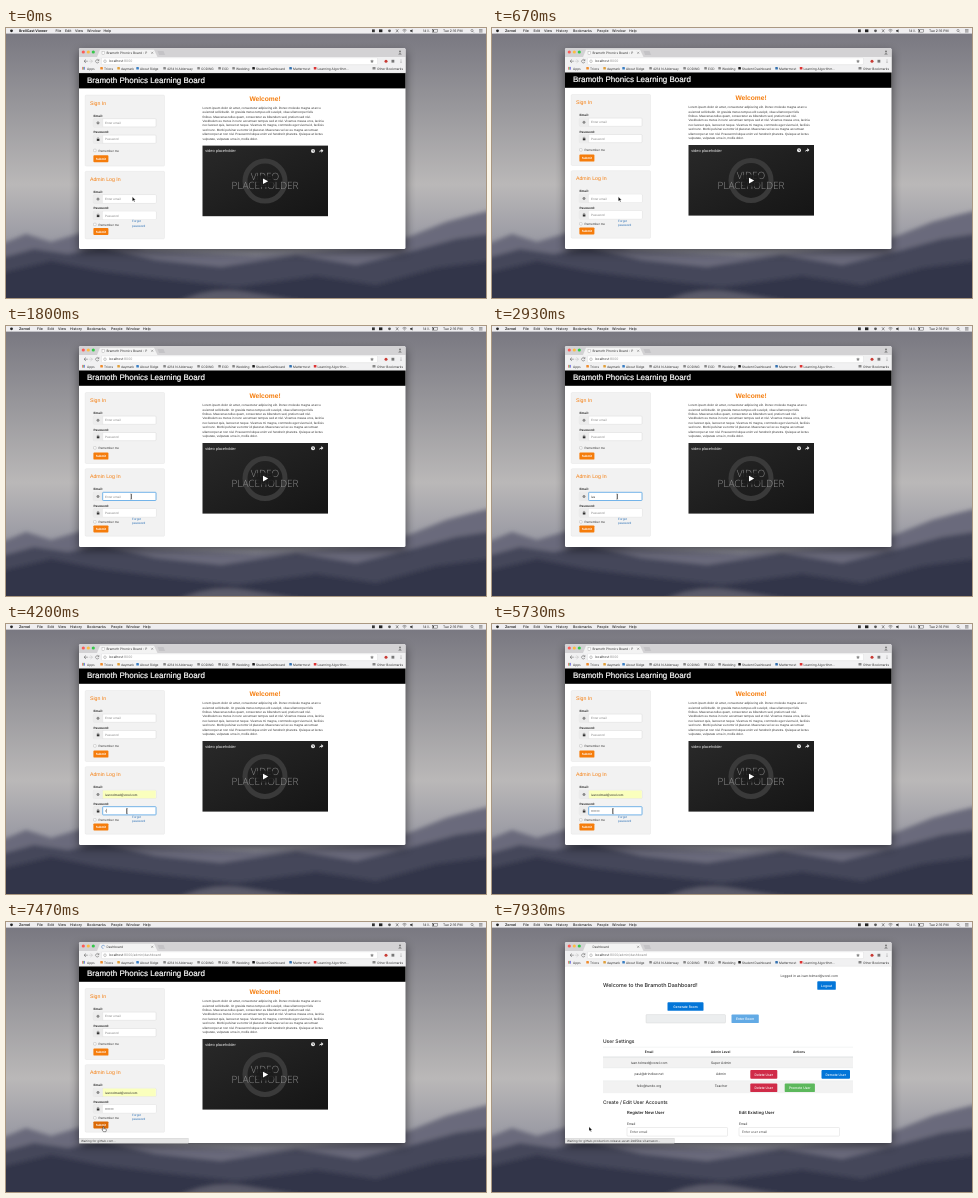
Write an HTML page that moves like this. It is 480 by 270 pixels and loops after 8000 ms.

```html
<!DOCTYPE html>
<html lang="en">
<head>
<meta charset="utf-8">
<title>Learning board sign-in</title>
<style>
  html, body { margin: 0; width: 100%; height: 100%; overflow: hidden; }
  svg { display: block; width: 480px; height: 270px; }
  text { text-rendering: geometricPrecision; white-space: pre; }
</style>
</head>
<body>
<svg id="stage" viewBox="0 0 480 270"></svg>
<script>
const LOOP = 8000;
const ORANGE = '#f57c0b', BLUE = '#0275d8', RED = '#d02b48', GREEN = '#5cb85c';
const WEB = 'Liberation Sans, Arial, sans-serif', UI = 'Inter, Roboto, sans-serif';
const MAIL = 'ivan.tolmed@vorel.com';

const rect = (x, y, w, h, fill, more = '') =>
  `<rect x="${x}" y="${y}" width="${w}" height="${h}" fill="${fill}" ${more}/>`;
const dot = (x, y, r, fill, more = '') =>
  `<circle cx="${x}" cy="${y}" r="${r}" fill="${fill}" ${more}/>`;
const path = (d, fill, more = '') => `<path d="${d}" fill="${fill}" ${more}/>`;
const line = (d, color, width = .5) =>
  path(d, 'none', `stroke="${color}" stroke-width="${width}"`);
const group = (id, ...parts) => `<g id="${id}">${parts.join('')}</g>`;
const label = (font) => (x, y, size, str, fill = '#333', more = '') =>
  `<text x="${x}" y="${y}" font-size="${size}" font-family="${font}" fill="${fill}" ${more}>${str}</text>`;
const web = label(WEB), ui = label(UI);
const BOLD = 'font-weight="700"', SEMI = 'font-weight="600"', MEDIUM = 'font-weight="500"';
const MID = 'text-anchor="middle"';

function wallpaper() {
  return `<defs>
    <linearGradient id="sky" x2="0" y2="1">
      <stop offset="0" stop-color="#77767f"/><stop offset=".3" stop-color="#99989c"/>
      <stop offset=".58" stop-color="#bab8b8"/><stop offset=".78" stop-color="#9b9ba4"/>
      <stop offset="1" stop-color="#6c6d7c"/>
    </linearGradient>
    <linearGradient id="film" x2="1" y2="1">
      <stop offset="0" stop-color="#292929"/><stop offset="1" stop-color="#151515"/>
    </linearGradient>
    <filter id="soft"><feGaussianBlur stdDeviation="2"/></filter>
    <filter id="shade"><feGaussianBlur stdDeviation="5"/></filter>
  </defs>` +
  rect(0, 0, 480, 270, 'url(#sky)') +
  `<g filter="url(#soft)">` +
  path('M-9 218L20 206 45 214 75 205 140 222 250 228 360 220 405 208 440 194 462 188 490 181V280H-9Z', '#6a6b7b') +
  path('M-9 231L28 221 62 226 95 219 150 232 215 239 290 227 350 237 410 222 450 211 490 205V280H-9Z', '#45475a') +
  path('M-9 246L45 233 95 243 150 250 230 259 310 248 370 257 430 240 490 232V280H-9Z', '#333548') +
  path('M160 280Q200 257 240 264T340 280Z', '#5b5c6b') + '</g>';
}

function menuBar() {
  const items = (list) => list.map(([x, s], i) =>
    ui(x, 4.1, 3.5, s, '#222', i ? MEDIUM : BOLD)).join('');
  return rect(0, 0, 480, 5.6, '#efeef0') + dot(5.5, 2.8, 1.4, '#222') +
    group('viewerMenu', items([[13, 'BrellCast Viewer'], [49.5, 'File'], [59, 'Edit'], [69, 'View'], [81, 'Window'], [97.5, 'Help']])) +
    group('browserMenu', items([[13, 'Zorvel'], [31, 'File'], [41.5, 'Edit'], [52, 'View'], [64, 'History'],
      [81, 'Bookmarks'], [105, 'People'], [120, 'Window'], [137, 'Help']])) +
    rect(366, 1.4, 2.8, 2.8, '#333') + rect(373, 1.4, 3.4, 2.8, '#222') + dot(383.5, 2.8, 1.4, '#555') +
    line('M390 1.3l2.4 3m0-3l-2.4 3', '#333') + line('M396.5 2.2q2-1.6 4 0m-3.2 1q1.2-1 2.4 0m-1.2.4v.8', '#333') +
    path('M404 2.2h1l1.5-1v3.4l-1.5-1h-1z', '#333') +
    ui(417, 4.1, 3.3, '14%', '#222') + rect(426.5, 1.7, 5, 2.4, 'none', 'stroke="#333" stroke-width=".4"') + rect(427, 2.1, 1, 1.6, '#333') +
    ui(437, 4.1, 3.4, 'Tue 2:16 PM', '#222') +
    dot(466, 2.5, 1.1, 'none', 'stroke="#333" stroke-width=".4"') + line('M466.8 3.4l1 1', '#333') +
    line('M473 1.6h3.5m-3.5 1.2h3.5m-3.5 1.2h3.5', '#333', .45);
}

function browser() {
  const marks = [[98, 'Trivos', '#ef8b2c'], [115, 'daymark', '#e0a03c'], [134, 'About Ridge', '#3a7fc4'],
    [161, '4214 N Alderway', '#888'], [195, 'CODING', '#888'], [216, 'EOD', '#888'], [230, 'Wedding', '#888'],
    [250, 'Student Dashboard', '#222'], [287, 'Mattermost', '#3572b0'], [311.5, 'Learning Algorithm...', '#d33']];
  return rect(73, 24, 327, 200, '#000', 'opacity=".5" filter="url(#shade)"') +
    rect(73, 20, 326.5, 201, '#fff', 'rx="1.5"') +
    path('M73 29V21.5q0-1.5 1.5-1.5H398q1.5 0 1.5 1.5V29Z', '#d3d2d4') +
    ['#fc5b57', '#fdbc40', '#34c84a'].map((c, i) => dot(77.3 + 5 * i, 24, 1.6, c)).join('') +
    path('M91 29L94 21.8H148L151.5 29Z', '#f3f3f3') + path('M151.5 23h6l1.6 4h-6z', '#c4c3c6') +
    line('M145.2 23.8l2 2m0-2l-2 2', '#555', .4) +
    dot(394, 23.5, 1, '#777') + path('M392.2 26.5q1.8-3 3.6 0z', '#777') +
    rect(73, 29, 326.5, 15.5, '#f1f1f2') + rect(95.5, 29.8, 276, 6.8, '#fff', 'rx=".8" stroke="#d0d0d0" stroke-width=".3"') +
    line('M80 31.5l-2 1.7 2 1.7m-2-1.7h3.8', '#555') + line('M84.5 31.5l2 1.7-2 1.7m2-1.7h-3.8', '#bbb') +
    line('M92.8 32.4a1.7 1.7 0 1 0 .1 1.5m0-2.7v1.5h-1.5', '#555') +
    dot(99, 33.2, 1.3, 'none', 'stroke="#666" stroke-width=".35"') +
    path('M366 31.4l.6 1.2 1.3.2-1 .9.3 1.3-1.2-.7-1.2.7.3-1.3-1-.9 1.3-.2z', '#888') +
    dot(380, 33.2, 1.5, '#c83a34') + rect(385.5, 31.8, 2.8, 2.8, '#777') + dot(395, 31.9, .4, '#555') + dot(395, 33.2, .4, '#555') + dot(395, 34.5, .4, '#555') +
    [0, 1, 2].map(i => rect(76 + i, 38.9, .7, 2.8, ['#d55', '#5a5', '#55d'][i])).join('') +
    ui(81, 41.6, 3.2, 'Apps') +
    marks.map(([x, s, c]) => rect(x - 3.7, 39, 2.6, 2.6, c, 'rx=".4"') + ui(x, 41.6, 3.2, s)).join('') +
    rect(366.5, 39, 3, 2.5, '#888', 'rx=".3"') + ui(371, 41.6, 3.2, 'Other Bookmarks') +
    line('M73 44.4H399.5', '#c4c4c4', .3) +
    ui(103, 34.4, 3.3, 'localhost<tspan fill="#888">:8000<tspan id="route">/admin/dashboard</tspan></tspan>') +
    group('boardTab', rect(96, 23.2, 2.4, 3, '#fff', 'stroke="#888" stroke-width=".3"'), ui(100.5, 25.8, 3.2, 'Bramoth Phonics Board - P')) +
    group('dashTab', ui(100.5, 25.8, 3.2, 'Dashboard')) +
    group('spinner', line('M97.2 23.2a1.6 1.6 0 1 1-1.6 1.6', '#4a7fc1'));
}

function field(y, icon, hint, id) {
  const glyph = icon === 'mail'
    ? dot(92, y + 4.2, 1.1, 'none', 'stroke="#333" stroke-width=".5"') + dot(92, y + 4.2, .5, '#333')
    : rect(90.8, y + 3.8, 2.6, 2, '#333') + line(`M91.3 ${y + 3.8}v-.7a.8.8 0 0 1 1.5 0v.7`, '#333', .4);
  return rect(87.4, y, 62.6, 8.2, '#fff', 'rx=".9" stroke="#ccc" stroke-width=".35"') +
    rect(87.6, y + .2, 9, 7.8, '#ececec') + line(`M96.7 ${y}v8.2`, '#ccc', .3) + glyph +
    (id ? rect(96.8, y + .2, 53, 7.8, '#fff', `id="${id}Fill"`) +
      rect(96.7, y, 53.3, 8.2, 'none', `id="${id}Focus" rx=".6" stroke="#55a5e8" stroke-width=".8"`) : '') +
    web(99, y + 5.3, 3.1, hint, '#888', id ? `id="${id}Text"` : '');
}

function panel(y, h, title, rememberY, id) {
  const buttonY = rememberY + (id ? 3.4 : 4.6);
  return rect(79.2, y, 79.3, h, '#f2f2f2', 'rx="1" stroke="#e1e1e1" stroke-width=".4"') +
    web(84, y + 9.6, 5.2, title, ORANGE) +
    web(87.4, y + 21.6, 3.1, 'Email:', '#222', BOLD) + field(y + 23.6, 'mail', 'Enter email', id && 'mail') +
    web(87.4, y + 38, 3.1, 'Password:', '#222', BOLD) + field(y + 40, 'lock', 'Password', id && 'pass') +
    rect(87.6, rememberY - 1.4, 2.5, 2.5, '#fff', 'rx=".4" stroke="#999" stroke-width=".35"') +
    web(92.5, rememberY + 1, 3.1, 'Remember me', '#333') +
    rect(87.4, buttonY, 15, 7, ORANGE, 'rx=".9"' + (id ? ' id="submit"' : '')) +
    web(94.9, buttonY + 4.6, 3.1, 'Submit', '#fff', MID + BOLD);
}

function board() {
  const lorem = ['Lorem ipsum dolor sit amet, consectetur adipiscing elit. Donec molestie magna at arcu',
    'euismod sollicitudin. Ut gravida metus tempus elit suscipit, vitae ullamcorper felis',
    'finibus. Maecenas tellus quam, consectetur eu bibendum sed, pretium sed nisl.',
    'Vestibulum eu metus in nunc accumsan tempus sed et nisl. Vivamus massa eros, lacinia',
    'nec laoreet quis, laoreet et neque. Vivamus mi magna, commodo eget viverra id, facilisis',
    'sed nunc. Morbi pulvinar eu tortor id placerat. Maecenas vel ex eu magna accumsan',
    'ullamcorper at non nisl. Praesent tristique enim vel hendrerit pharetra. Quisque at lectus',
    'vulputate, vulputate urna in, mollis dolor.'];
  const film = (y, s) => label('Open Sans, Noto Sans, sans-serif')(259, y, 10, s, '#8f8f8f', MID + ' font-weight="300"');
  return group('board',
    rect(73, 44.5, 326.5, 15.3, '#000'),
    web(81, 54, 8, 'Bramoth Phonics Learning Board', '#fff', 'stroke="#fff" stroke-width=".2"'),
    panel(66.5, 71, 'Sign In', 122), panel(142.7, 67.5, 'Admin Log In', 196, true),
    web(126, 193.9, 3.1, 'Forgot', '#2a6fb5'), web(126, 198.2, 3.1, 'password', '#2a6fb5'),
    web(259, 72.4, 6.65, 'Welcome!', ORANGE, MID + BOLD),
    lorem.map((s, i) => web(196.5, 80.1 + 4.43 * i, 3.1, s)).join(''),
    rect(196.5, 117, 125.5, 70.6, 'url(#film)'),
    dot(259, 152.5, 20, 'none', 'stroke="#3a3a3a" stroke-width="5"'),
    film(151, 'VIDEO'), film(160.8, 'PLACEHOLDER'),
    rect(250.3, 146.8, 17.4, 11.6, '#1b1b1b', 'rx="2.5" opacity=".85"'),
    path('M257 149.8l5.2 2.8-5.2 2.8z', '#fff'),
    web(199.3, 123.5, 3.9, 'video placeholder', '#eee'),
    dot(307, 122.3, 2, '#eee'), line('M307 121v1.5h1', '#222'),
    path('M313.2 124q0-2.5 2.2-2.6v-1.3l2 2-2 2v-1.4q-1.4 0-2.2 1.3z', '#eee'));
}

function button(x, y, w, str, fill, h = 8.6) {
  return rect(x, y, w, h, fill, 'rx=".9"') + ui(x + w / 2, y + h / 2 + 1.2, 3.3, str, '#fff', MID + MEDIUM);
}

function dashboard() {
  const rows = [[140.5, MAIL, 'Super Admin'], [151.3, 'paul@drindlow.net', 'Admin'], [164, 'felix@tundo.org', 'Teacher']];
  const form = (x, title, hint) => ui(x, 192.4, 4.2, title, '#222', SEMI) + ui(x, 202.6, 3.3, 'Email') +
    rect(x, 205.5, 100.5, 8.6, '#fff', 'rx=".8" stroke="#ccc" stroke-width=".35"') + ui(x + 3, 211, 3.3, hint, '#555');
  return group('dash', rect(73.2, 44.6, 326.1, 176, '#fff'),
    ui(346, 54.7, 3.3, 'Logged in as ' + MAIL, '#333', 'text-anchor="end"'),
    ui(111, 65, 5.4, 'Welcome to the Bramoth Dashboard!', '#222', MEDIUM),
    button(325.3, 59.2, 18.5, 'Logout', BLUE), button(175.5, 80.2, 36, 'Generate Room', BLUE),
    rect(154, 92.6, 79.5, 8.4, '#eceeef', 'rx=".8" stroke="#ccc" stroke-width=".35"'),
    button(239.5, 92.5, 27.3, 'Enter Room', '#62aae5'),
    ui(111, 121.4, 4.9, 'User Settings', '#222', MEDIUM),
    rect(111, 135, 250, 10.8, '#f2f2f2'), rect(111, 158.8, 250, 12.4, '#f2f2f2'),
    line('M111 125.2h250m-250 20.6h250m-250 13h250', '#e0e2e4', .4), line('M111 135h250', '#d5d8da', .7),
    [[157, 'Email'], [228.5, 'Admin Level'], [307, 'Actions']].map(([x, s]) => ui(x, 131.4, 3.3, s, '#222', MID + SEMI)).join(''),
    rows.map(([y, mail, level]) => ui(157, y + 1.2, 3.3, mail, '#333', MID) + ui(229, y + 1.2, 3.3, level, '#333', MID)).join(''),
    button(258.3, 148.1, 27, 'Delete User', RED), button(258.3, 161.5, 27, 'Delete User', RED),
    button(329.5, 148.1, 28.5, 'Demote User', BLUE), button(292.7, 161.5, 30.2, 'Promote User', GREEN),
    ui(111, 182, 4.9, 'Create / Edit User Accounts', '#222', MEDIUM),
    form(135, 'Register New User', 'Enter email'), form(247, 'Edit Existing User', 'Enter user email'));
}

const stage = document.getElementById('stage');
stage.innerHTML = wallpaper() + menuBar() + browser() + board() + dashboard() +
  group('status', rect(73.2, 216.3, 109, 5, '#e6e6e6', 'stroke="#bbb" stroke-width=".3"'), ui(75, 220, 3, '', '#444', 'id="statusText"')) +
  rect(0, 0, .35, 4, '#111', 'id="caret"') +
  group('pointer',
    group('arrow', path('M0 0V4.4L1.1 3.5 1.9 5.1 2.6 4.8 1.9 3.2H3.2Z', '#000', 'stroke="#fff" stroke-width=".35"')),
    group('beam', line('M-.8-2q.8 0 .8.5v4.2q0 .5-.8.5m1.6 0q-.8 0-.8-.5V-1.5q0-.5.8-.5', '#222', .5)),
    group('hand', path('M0 0q.7-.4.9.3v1.6l2 .5q.7.3.5 1L2.9 5H.4L-1 3q.2-.8 1-.2Z', '#fff', 'stroke="#111" stroke-width=".45"')));

const $ = (id) => document.getElementById(id);
const show = (id, on) => $(id).setAttribute('display', on ? 'inline' : 'none');
const write = (id, str, fill) => { $(id).textContent = str; $(id).setAttribute('fill', fill); };
const passed = (times, t) => times.filter(at => t >= at).length;

const route = [[0, 126.3, 168.8], [1400, 126.3, 168.8], [1700, 125.3, 170], [3600, 125.3, 170],
  [4000, 120.8, 186.5], [5730, 120.8, 186.5], [6330, 97, 204.7], [LOOP, 97, 204.7]];
const letterTimes = [2670, 2800, 2930, 3070], dotTimes = [4130, 4470, 4600, 4730, 4870, 5000, 5130, 5270];
const FRONT = 670, MAIL_FOCUS = 1600, FILLED = 3270, PASS_FOCUS = 4070, SEND = 6600, ANSWER = 7400, OPEN = 7670;

function pointerAt(t) {
  const i = route.findIndex(([at]) => at > t);
  const [t0, x0, y0] = route[i - 1], [t1, x1, y1] = route[i];
  const p = (t - t0) / (t1 - t0), e = p * p * (3 - 2 * p);
  return [x0 + (x1 - x0) * e, y0 + (y1 - y0) * e];
}

function draw(t) {
  const front = t >= FRONT, open = t >= OPEN, answered = t >= ANSWER;
  show('viewerMenu', !front); show('browserMenu', front);
  show('board', !open); show('dash', open);
  $('board').setAttribute('transform', `translate(0 ${front ? 0 : .6})`);
  show('boardTab', !answered); show('dashTab', answered); show('route', answered);

  const letters = passed(letterTimes, t), dots = passed(dotTimes, t), filled = t >= FILLED;
  write('mailText', filled ? MAIL : letters ? MAIL.slice(0, letters) : 'Enter email', letters ? '#222' : '#888');
  $('mailFill').setAttribute('fill', filled ? '#faffbd' : '#fff');
  write('passText', dots ? '•'.repeat(dots) : 'Password', dots ? '#222' : '#888');
  const inMail = t >= MAIL_FOCUS && t < PASS_FOCUS, inPass = t >= PASS_FOCUS && t < SEND;
  show('mailFocus', inMail); show('passFocus', inPass);
  show('caret', (inMail || inPass) && t < 6330 && t % 1000 < 530);
  const typed = $(inPass ? 'passText' : 'mailText');
  const width = (inPass ? dots : letters) ? typed.getComputedTextLength() : 0;
  $('caret').setAttribute('x', 99 + width);
  $('caret').setAttribute('y', inPass ? 184.8 : 168.4);
  $('submit').setAttribute('fill', t >= 6330 ? '#dc6a05' : ORANGE);

  show('status', t >= SEND);
  $('statusText').textContent = open ? 'Waiting for github-production-release-asset-2e65be.s3.amazon...'
    : answered ? 'Waiting for github.com...' : 'Waiting for localhost...';
  show('spinner', t >= SEND && !open);
  if (t >= SEND) show('boardTab', !answered);
  $('spinner').setAttribute('transform', `rotate(${t * .36} 97.2 24.8)`);

  const shape = open || t < 1500 ? 'arrow' : t < 6130 ? 'beam' : 'hand';
  ['arrow', 'beam', 'hand'].forEach(id => show(id, id === shape));
  $('pointer').setAttribute('transform', `translate(${pointerAt(t)})`);
}

const start = performance.now();
function tick() {
  draw((performance.now() - start) % LOOP);
  requestAnimationFrame(tick);
}
tick();
</script>
</body>
</html>
```
